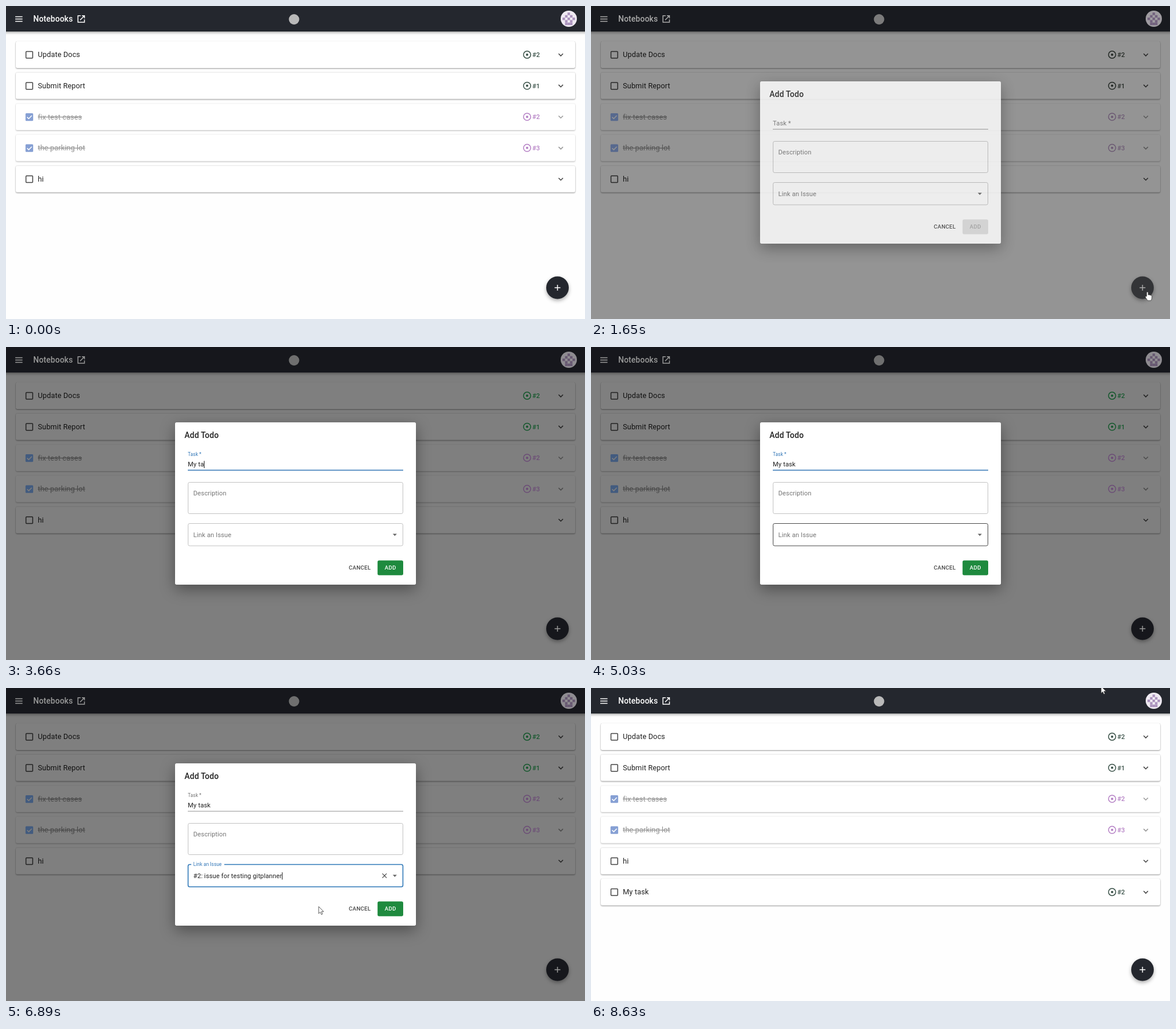
These frames come from a looping animation (1000 by 540 pixels, 9.5 s). An HTML page:

```html
<!DOCTYPE html>
<html lang="en">
<head>
<meta charset="utf-8">
<title>Todo list</title>
<style>
  html, body { margin: 0; width: 100%; height: 100%; overflow: hidden; background: #fefefe; }
  svg { display: block; width: 100%; height: 100%; }
  text { font-family: Roboto, sans-serif; white-space: pre; fill: #212121; }
  .line { fill: none; stroke: #444; stroke-width: 1.5; }
  .card { fill: #fff; filter: drop-shadow(0 1px 1px rgba(0,0,0,.36)) drop-shadow(0 0 .6px rgba(0,0,0,.2)); }
  .task { font-size: 12.6px; letter-spacing: .0094em; }
  .done .task { fill: #929292; text-decoration: line-through; }
  .done .card { filter: drop-shadow(0 1px 1px rgba(0,0,0,.25)) drop-shadow(0 0 .6px rgba(0,0,0,.14)); }
  .done .chevron { stroke: #999; }
  .chip { color: var(--open); }
  .done .chip { color: var(--closed); }
  .chip text { font-size: 11px; font-weight: 500; fill: currentColor; }
  .chip .line { stroke: currentColor; }
  .title { font-size: 13.8px; font-weight: 500; letter-spacing: .0075em; }
  .field, .label { font-size: 11.05px; letter-spacing: .01em; }
  .label { fill: #757575; }
  .button { font-size: 9.6px; font-weight: 500; letter-spacing: .0286em; }
  .outline { fill: none; stroke: #c2c2c2; }
  #bar { fill: #24272e; filter: drop-shadow(0 2px 2px rgba(0,0,0,.35)); }
  #fab { filter: drop-shadow(0 3px 3px rgba(0,0,0,.32)); }
  #panel { fill: #fff; filter: drop-shadow(0 8px 13px rgba(0,0,0,.38)); }
  #menu rect:first-child { fill: #fff; filter: drop-shadow(0 2px 3px rgba(0,0,0,.35)); }
  .white { stroke: #fff; }
  .pointer { fill: #fff; stroke: #333; stroke-width: .8; stroke-linejoin: round; }
</style>
</head>
<body>
<svg id="stage" viewBox="0 0 1000 540">
  <rect width="1000" height="540" fill="#fefefe"/>
  <g id="rows"></g>
  <rect id="backdrop" width="1000" height="540"/>

  <g id="chrome">
    <rect id="bar" x="-5" y="-5" width="1010" height="49"/>
    <path class="line white" d="M16 18.4h12.5M16 22.4h12.5M16 26.4h12.5"/>
    <text class="title" x="47" y="27.2" style="fill:#fff">Notebooks</text>
    <path class="line white" d="M129 16.8h-4.7v11.2h11.2v-4.8M131 16.8h4.5v4.5M135.3 17l-7.3 7.3"/>
    <circle cx="497.5" cy="23" r="9" fill="#b9b9b9"/>
    <circle cx="972" cy="22" r="14" fill="#efeaf2"/>
    <g id="avatar" fill="#ab93bd"></g>
    <circle id="fab" cx="952.5" cy="486" r="19.5"/>
    <path class="line white" d="M947.5 486h10M952.5 481v10"/>
  </g>

  <g id="dialog">
    <rect id="panel" x="292" y="130" width="416" height="280" rx="2.7"/>
    <text class="title" x="308.3" y="157.2">Add Todo</text>

    <text id="taskLabel" class="label" x="314">Task *</text>
    <text id="taskText" class="field" x="314" y="206"></text>
    <path id="taskLine" d="M314 212.6h372"/>
    <path id="taskFocus" stroke="#3478b8" stroke-width="1.5"/>

    <rect class="outline" x="314.5" y="233.5" width="371" height="54" rx="2.7"/>
    <text class="label" x="323.5" y="256">Description</text>

    <rect id="linkBox" class="outline" x="314.5" y="304.5" width="371" height="38.5" rx="2.7"/>
    <rect id="notch" x="320" y="302" height="5" fill="#fff"/>
    <text id="linkLabel" class="label" x="323.5">Link an Issue</text>
    <text id="linkText" class="field" x="323.5" y="327.8"></text>
    <path id="clear" class="line" style="stroke-width:1.2" d="M650 320.2l7.4 7.4m0-7.4l-7.4 7.4"/>
    <path id="drop" d="M668 322.3h7l-3.5 3.6z" fill="#666"/>
    <path id="caret" stroke="#111"/>

    <text class="button" x="592" y="384.2" style="fill:#444">CANCEL</text>
    <rect id="add" x="641.7" y="368.3" width="44.3" height="25.4" rx="2.7"/>
    <text id="addText" class="button" x="654" y="384.2">ADD</text>

    <g id="menu">
      <rect x="314" y="344" width="372" height="36" rx="2.7"/>
      <rect id="option" x="314" y="349.5" width="372" height="25" fill="#f2f2f2"/>
      <text class="field" x="325" y="366">#2: issue for testing gitplanner</text>
    </g>
  </g>

  <path id="arrow" class="pointer" d="M0 0v12.2l2.8-2.6 1.9 4.2 2-.9-1.9-4.1h3.8z"/>
  <path id="hand" class="pointer" d="M-1.3 8V1Q0-1 1.3 1v4.4q1.4-.9 2.2.3 1.4-.7 2.2.5 1.9-.6 2 1.2v3.4q-.2 2.6-1.7 4.4H.3Q-1.8 12-3.8 9q.8-2 2.5-1z"/>
</svg>

<script>
const LOOP = 9500, STEP = 125;
const $ = id => document.getElementById(id);
const set = (id, attrs) => { for (const k in attrs) $(id).setAttribute(k, attrs[k]); };
const show = (id, on) => set(id, { visibility: on ? 'inherit' : 'hidden' });
const clamp = v => Math.max(0, Math.min(1, v));
const mix = (a, b, p) => a + (b - a) * p;

const TASK = 'My task', ISSUE = '#2: issue for testing gitplanner';
const KEY_TIMES = [2875, 3125, 3250, 3375, 3625, 4000, 4125];
const OPEN = 1500, HOVER_TASK = 2250, FOCUS_TASK = 2500, HOVER_LINK = 5000,
      FOCUS_LINK = 5375, PICK = 6500, SUBMIT = 7500, CLOSE = 7693;

// Pointer path: time, x, y, look until the next entry
const POINTER = [
  [0, 884, -16, ''], [750, 884, -16, 'arrow'], [1375, 961, 493, 'hand'],
  [1750, 961, 493, 'arrow'], [HOVER_TASK, 500, 202, ''], [4750, 500, 202, ''],
  [HOVER_LINK, 540, 322, ''], [5875, 540, 322, 'arrow'], [6125, 540, 362, 'hand'],
  [PICK, 540, 362, 'arrow'], [6750, 540, 377, 'arrow'], [7125, 540, 377, 'arrow'],
  [SUBMIT, 668, 385, 'hand'], [7875, 668, 385, 'arrow'], [8375, 668, 385, 'arrow'],
  [8625, 881, -3, 'arrow'], [LOOP, 881, -3, 'arrow']
];

// Accent colours: start time, open issue, closed issue, checkbox
const ACCENTS = [
  [0, '#3a5148', '#b47fc4', '#86a0d4'],
  [OPEN, '#3c463f', '#b898c4', '#96b4f4'],
  [1750, '#3c463f', '#9a9a9a', '#a4a4a4'],
  [FOCUS_TASK, '#2ab05a', '#d898ee', '#86b8ff'],
  [7625, '#2a7a50', '#c288e2', '#8eaff0'],
  [7875, '#3a5148', '#b47fc4', '#86a0d4']
];

// Material standard curve, cubic-bezier(.4, 0, .2, 1)
function ease(x) {
  x = clamp(x);
  let lo = 0, hi = 1;
  for (let i = 0; i < 20; i++) {
    const s = (lo + hi) / 2, r = 1 - s;
    if (1.2 * r * r * s + .6 * r * s * s + s ** 3 < x) lo = s; else hi = s;
  }
  return 3 * lo * lo - 2 * lo ** 3;
}

function row([name, issue, done], i) {
  const chip = issue && `<g class="chip"><circle class="line" cx="900" cy="23" r="6.2"/>
    <circle cx="900" cy="23" r="2" fill="currentColor"/><text x="909" y="27">${issue}</text></g>`;
  const box = done
    ? `<rect x="33.7" y="16.8" width="13.2" height="13.2" rx="1.5" fill="var(--check)"/>
       <path class="line white" d="M36.4 23.4l2.9 2.9 5.2-5.4"/>`
    : '<rect class="line" x="34.5" y="17.5" width="11.6" height="11.6" rx="1"/>';
  return `<g id="row${i}" class="${done ? 'done' : ''}" transform="translate(0 ${61 + 53.6 * i})">
    <rect class="card" x="17" width="966" height="46" rx="2.5"/>${box}
    <text class="task" x="55" y="27.4">${name}</text>${chip}
    <path class="line chevron" d="M954.4 21.3l3.8 3.8 3.8-3.8"/></g>`;
}

$('rows').innerHTML = [
  ['Update Docs', '#2'], ['Submit Report', '#1'], ['fix test cases', '#2', true],
  ['the parking lot', '#3', true], ['hi', ''], [TASK, '#2']
].map(row).join('');

$('avatar').innerHTML = ['00100', '01010', '10101', '01010', '01110'].map((cells, y) =>
  [...cells].map((c, x) => c > 0
    ? `<rect x="${961.2 + x * 4.3}" y="${11.4 + y * 4.3}" width="4.3" height="4.3"/>` : '').join('')).join('');

function drawPointer(t) {
  const i = POINTER.findLastIndex(k => k[0] <= t);
  const a = POINTER[i], b = POINTER[i + 1] || a;
  const p = ease((t - a[0]) / (b[0] - a[0] || 1));
  for (const look of ['arrow', 'hand']) {
    show(look, a[3] === look);
    set(look, { transform: `translate(${mix(a[1], b[1], p)} ${mix(a[2], b[2], p)})` });
  }
}

function drawLabel(id, y, smallY, shrink, focused) {
  set(id, { y: mix(y, smallY, shrink) });
  $(id).style.fontSize = mix(11.05, 8.25, shrink) + 'px';
  $(id).style.fill = focused ? '#3478b8' : '#757575';
}

function drawDialog(t) {
  const onTask = t >= FOCUS_TASK && t < FOCUS_LINK;
  const onLink = t >= FOCUS_LINK && t < SUBMIT;
  const typed = KEY_TIMES.filter(k => k <= t).length;
  const picked = t >= PICK;

  drawLabel('taskLabel', 206, 188, ease((t - FOCUS_TASK) / 200), onTask);
  $('taskText').textContent = TASK.slice(0, typed);
  const hover = t >= HOVER_TASK && t < FOCUS_TASK;
  set('taskLine', { stroke: hover ? '#333' : '#8c8c8c', 'stroke-width': hover ? 1.5 : .9 });
  const half = onTask ? 186 * ease((t - FOCUS_TASK) / 200) : 0;
  set('taskFocus', { d: `M${500 - half} 212.4h${2 * half}` });

  const shrink = ease((t - FOCUS_LINK) / 200);
  drawLabel('linkLabel', 327.5, 307.3, shrink, onLink);
  set('notch', { width: 57 * shrink });
  $('linkBox').style.stroke = onLink ? '#2f78b8' : t >= HOVER_LINK && t < FOCUS_LINK ? '#484848' : '#c2c2c2';
  $('linkBox').style.strokeWidth = onLink ? 1.6 : 1;
  $('linkText').textContent = picked ? ISSUE : '';
  show('clear', picked && onLink);
  const menuOpen = onLink && !picked;
  show('menu', menuOpen);
  show('option', t >= 6000 && menuOpen);
  set('drop', { transform: `rotate(${menuOpen ? 180 : 0} 671.5 324)` });

  const last = Math.max(...[FOCUS_TASK, ...KEY_TIMES, FOCUS_LINK, PICK].filter(k => k <= t));
  show('caret', (onTask || onLink) && Math.floor((t - last) / 500) % 2 === 0);
  const [field, x, y] = onLink ? ['linkText', 323.5, 318] : ['taskText', 314, 196.5];
  set('caret', { d: `M${x + .5 + $(field).getComputedTextLength()} ${y}v12.5` });

  set('add', { fill: typed ? '#1e8a3e' : '#e0e0e0' });
  $('addText').style.fill = typed ? '#fff' : '#a6a6a6';
}

function draw(t) {
  const p = t < CLOSE ? ease((t - OPEN) / 225) : 1 - ease((t - CLOSE) / 195);
  const [, open, closed, check] = ACCENTS.findLast(a => a[0] <= t);
  const style = $('stage').style;
  style.setProperty('--open', open);
  style.setProperty('--closed', closed);
  style.setProperty('--check', check);
  show('row5', t >= 7625);
  set('backdrop', { opacity: .5 * p });
  $('chrome').style.filter = `brightness(${1 - .4 * p})`;
  set('fab', { fill: t >= 1375 && t < 1750 ? '#4c4e52' : '#24272e' });
  set('dialog', { opacity: p, visibility: p > 0 ? 'visible' : 'hidden' });
  drawDialog(t);
  drawPointer(t);
}

function tick() {
  const t = performance.now() % LOOP;
  draw(Math.floor(t / STEP) * STEP);
  requestAnimationFrame(tick);
}
tick();
</script>
</body>
</html>
```
